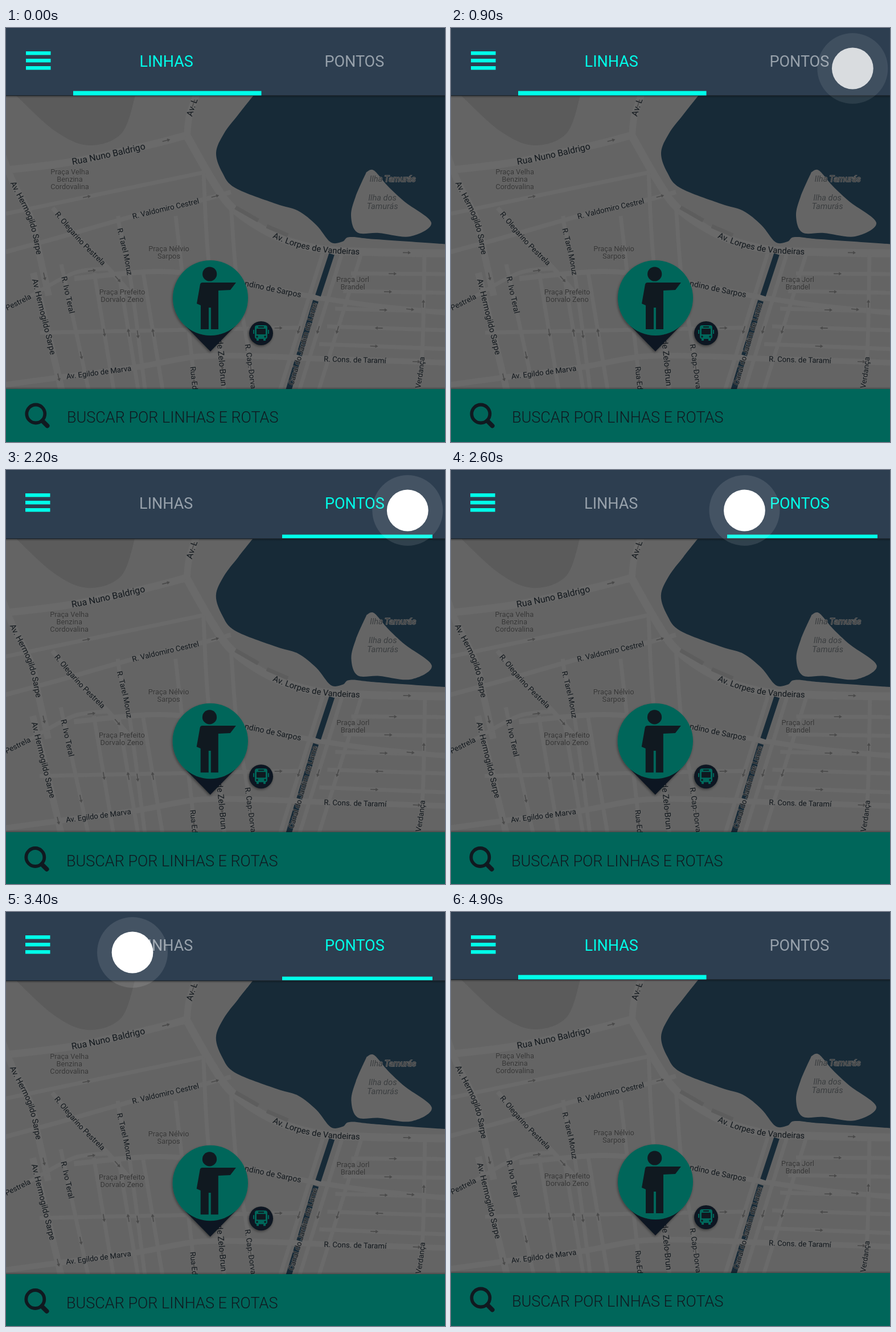
Recreate the animation shown at these times as an HTML page. Size 771 px wide and 727 px high, loop 6400 ms.

```html
<!DOCTYPE html>
<html lang="pt">
<head>
<meta charset="utf-8">
<title>Linhas e pontos</title>
<style>
html, body { margin: 0; width: 100%; height: 100%; overflow: hidden; background: #2d3e50; }
svg { display: block; width: 100%; height: 100%; font-family: Roboto, sans-serif; }
.road { fill: none; stroke: #6a6a6a; }
.street { fill: #12181d; stroke: #686868; stroke-width: 1.6; paint-order: stroke; }
.place { fill: #363636; stroke: #686868; stroke-width: 1.6; paint-order: stroke; text-anchor: middle; }
.isle { font-style: italic; fill: #3a3d3f; }
.tab { font-size: 27px; }
</style>
</head>
<body>
<svg id="stage" viewBox="0 0 771 727"></svg>
<script>
const CYAN = '#00ffe9', GREY = '#97a1ab', TEAL = '#00665a', INK = '#101920', WATER = '#172a37';
const LOOP = 6400, STEP = 100;

const roads = [], arrows = [], labels = [];
const points = text => text.split(' ').map(pair => pair.split(',').map(Number));

// Smooth curve through a few points
function curve(text) {
  const p = points(text);
  const at = i => p[Math.max(0, Math.min(p.length - 1, i))];
  const handle = (i, side) => at(i).map((v, k) => v + side * (at(i + 1)[k] - at(i - 1)[k]) / 6);
  return `M${p[0]}` + p.slice(1).map((end, i) => `C${handle(i, 1)} ${handle(i + 1, -1)} ${end}`).join('');
}

function addArrow([x0, y0], [x1, y1], part, way = 1) {
  const angle = Math.atan2((y1 - y0) * way, (x1 - x0) * way) * 180 / Math.PI;
  const x = x0 + (x1 - x0) * part, y = y0 + (y1 - y0) * part;
  arrows.push(`<path fill="#4a4a4a" d="M-7-.8H2V-3L7 0 2 3V.8H-7Z"
    transform="translate(${x} ${y}) rotate(${angle})"/>`);
}

function addRoad(width, d) {
  roads.push(`<path class="road" stroke-width="${width}" d="${d}"/>`);
}

// Straight street with one arrow
function lane(from, to, part = .5, way = 1) {
  addRoad(7, `M${from}L${to}`);
  addArrow(from, to, part, way);
}

// Name written along a path, starting at a distance from its beginning
function addLabel(d, name, start, size) {
  const id = 'way' + labels.length;
  labels.push(`<path id="${id}" fill="none" d="${d}"/><text class="street" font-size="${size}" dy=".35em">
    <textPath href="#${id}" startOffset="${start}">${name}</textPath></text>`);
}

function avenue(width, text, name, start, size = 13.2) {
  const d = curve(text);
  addRoad(width, d);
  addLabel(d, name, start, size);
  const [from, to] = points(text).slice(-2);
  addArrow(from, to, .5);
  return d;
}

const place = (lines, x, y, size = 12.8, gap = 13, extra = '') => lines.map((line, i) =>
  `<text class="place ${extra}" font-size="${size}" x="${x}" y="${y + i * gap}">${line}</text>`).join('');

function layStreets() {
  for (let i = 0; i < 3; i++) {
    lane([155 + 43 * i, 430], [190 + 43 * i, 640], .5, i ? -1 : 1);
    lane([556 + 34 * i, 396], [480 + 34 * i, 640], .55);
  }
  for (let i = 0; i < 5; i++) {
    lane([606 - 14 * i, 431 + 31 * i], [780, 432 + 33 * i], .42, i === 3 ? -1 : 1);
  }
  lane([0, 326], [355, 252], .4);
  lane([60, 535], [520, 526], .91);

  avenue(13, '-5,250 115,235 245,207 318,188', 'Rua Nuno Baldrigo', 122, 15.8);
  avenue(12, '318,190 322,154 337,110', 'Av. L', 36, 15);
  avenue(12, '-8,218 12,270 44,335 60,403 75,470', 'Av. Hermogildo Sarpe', 56, 14.2);
  avenue(12, '48,430 85,582 100,645', 'Av. Hermogildo Sarpe', 11, 14.2);
  avenue(8, '-8,395 85,370 222,331 340,303 395,288', 'R. Valdomiro Cestrel', 239);
  avenue(8, '82,316 130,372 178,420 215,462', 'R. Olegarino Pestrela', 11);
  avenue(14, '318,190 364,270 400,318 467,362 540,386 628,393 780,396', 'Av. Lorpes de Vandeiras', 236, 14.6);
  avenue(7, '197,330 200,352 218,436 245,640', 'R. Tarel Moruz', 22);
  avenue(7, '97,415 102,437 118,510 146,640', 'R. Ivo Teral', 22, 13.6);
  avenue(7, '-8,496 46,469 120,430 182,422', 'Pestrela', 9);
  avenue(9, '120,440 250,428 330,432 415,447 523,469 640,487 780,501', 'ndino de Sarpos', 302, 14);
  avenue(7, '395,310 405,440 424,555 436,640', 'R. Cap. Dorva', 247);
  avenue(7, '347,255 355,400 375,547 384,640', 'de Zelo Brun', 294, 14.6);
  avenue(7, '298,330 328,594 332,640', 'Rua Ed', 266);
  avenue(7, '719,655 731,570 735,398', 'Verdança', 23);
  const main = avenue(10, '-5,627 106,612 227,596 335,577 430,576 558,581 662,584 780,588',
    'Av. Egildo de Marva', 112);
  addLabel(main, 'R. Cons. de Taramí', 567, 13.2);
  addLabel('M498 634L544 478', 'Canal do Jardim de Lume', 8, 13.2);
}

const pin = () => `
  <g filter="url(#soft)">
    <path fill="${INK}" d="M315 523H403L359 568Z"/>
    <circle cx="359" cy="474" r="66" fill="${TEAL}"/>
  </g>
  <g fill="${INK}">
    <circle cx="357.7" cy="432" r="12.6"/>
    <path d="M341 450Q342 447 345 447H404L394 460 373 461V529H360V491H356V529H342V487L335 484Z"/>
    <circle cx="448" cy="536" r="21" filter="url(#soft)"/>
  </g>
  <g fill="${TEAL}">
    <rect x="437" y="522" width="22" height="24" rx="4"/>
    <path d="M440 545H444V549H440ZM452 545H456V549H452ZM434 530H436V537H434ZM460 530H462V537H460Z"/>
  </g>
  <g fill="${INK}">
    <rect x="440" y="528" width="16" height="10" rx="1"/><rect x="443" y="524" width="10" height="2"/>
    <circle cx="441" cy="542" r="1.7"/><circle cx="455" cy="542" r="1.7"/>
  </g>`;

function map() {
  layStreets();
  const shore = '439,113 408,152 383,185 369,219 380,254 403,281 475,309 513,321 545,346 570,376 591,375 604,367 650,371 780,380';
  const island = '633,253 646,250 670,277 700,305 747,342 710,366 655,360 617,359 606,330 614,296 633,253';
  return `<g id="map">
    <rect x="-5" y="100" width="790" height="560" fill="#646464"/>
    <path fill="#5b5b5b" d="${curve('14,115 85,180 145,206 203,185 228,115')}Z"/>
    ${roads.join('')}
    <path stroke="#5d5d5d" stroke-width="7" d="M403 315L443 338M458 348L495 364"/>
    <path fill="${WATER}" d="${curve(shore)}V113Z"/>
    <path fill="#656565" d="${curve(island)}Z"/>
    <path stroke="${WATER}" stroke-width="10" d="M572 397L548 470M544 479L515 575M512 584L495 640"/>
    ${arrows.join('')}${labels.join('')}
    ${place(['Praça Velha', 'Benzina', 'Cordovalina'], 112, 257)}
    ${place(['Praça Nélvio', 'Sarpos'], 286, 392)}
    ${place(['Praça Prefeito', 'Dorvalo Zeno'], 204, 468)}
    ${place(['Praça Jorl', 'Brandel'], 609, 446)}
    ${place(['Ilha Tamurás'], 679, 270, 14.6, 15, 'isle')}
    ${place(['Ilha dos', 'Tamurás'], 661, 303, 14.6, 15, 'isle')}
    ${pin()}
  </g>`;
}

// One full screen with the first or the second tab selected
function screen(first) {
  const head = first ? 118 : 120, foot = first ? 634 : 636, dx = first ? 0 : -1;
  const line = first ? 'x="118" y="110.6" width="330.5" height="7.8"' : 'x="485" y="113.5" width="264" height="6.3"';
  const bars = [0, 1, 2].map(i => `<rect x="${35 + dx}" y="${41 + 13 * i}" width="43.5" height="6.4"/>`).join('');
  return `
    <g ${first ? '' : 'transform="matrix(1.0025 0 0 1.0032 -1.1 .5)"'}>${first ? map() : '<use href="#map"/>'}</g>
    <rect y="${head}" width="771" height="5" fill="url(#shade)"/>
    <rect width="771" height="${head}" fill="#2d3e50"/>
    <rect width="771" height="1" fill="#26364a"/>
    <rect y="${head}" width="771" height="1.3" fill="#1d252d"/>
    <g fill="${CYAN}">${bars}<rect ${line}/></g>
    <text class="tab" x="${234.6 + dx / 2}" y="68" fill="${first ? CYAN : GREY}">LINHAS</text>
    <text class="tab" x="${559.4 - dx / 2}" y="68" fill="${first ? GREY : CYAN}">PONTOS</text>
    <rect y="${foot - 4}" width="771" height="4" fill="url(#rise)"/>
    <rect y="${foot}" width="771" height="100" fill="${TEAL}"/>
    <g transform="translate(${dx} ${first ? 0 : 2.5})">
      <circle cx="52.3" cy="677.5" r="16" fill="none" stroke="${INK}" stroke-width="5.8"/>
      <path d="M64 690L72.5 698.5" stroke="${INK}" stroke-width="8" stroke-linecap="round"/>
      <text class="tab" x="107" y="693" font-weight="300" fill="${INK}">BUSCAR POR LINHAS E ROTAS</text>
    </g>`;
}

const fade = (id, from, to) => `<linearGradient id="${id}" x1="0" y1="0" x2="0" y2="1">
  <stop offset="0" stop-opacity="${from}"/><stop offset="1" stop-opacity="${to}"/></linearGradient>`;

document.getElementById('stage').innerHTML = `
  <defs>${fade('shade', .35, 0)}${fade('rise', 0, .25)}
    <filter id="soft" x="-20%" y="-20%" width="140%" height="140%">
      <feDropShadow dx="-1" dy="2" stdDeviation="2" flood-opacity=".4"/></filter></defs>
  <g>${screen(true)}</g>
  <g id="next">${screen(false)}</g>
  <g id="touch" fill="#fff"><circle r="62" fill-opacity=".11"/><circle r="36.4"/></g>`;

const next = document.getElementById('next');
const touch = document.getElementById('touch');

// Progress from 0 to 1 between two times
const ramp = (t, from, to) => Math.max(0, Math.min(1, (t - from) / (to - from)));

function draw(now) {
  const t = Math.floor((now % LOOP) / STEP) * STEP;
  const leave = ramp(t, 4300, 4900);
  const x = 705.3 - 474.7 * ramp(t, 2200, 3200) - 47 * ramp(t, 3200, 4300);
  next.setAttribute('opacity', ramp(t, 1100, 2200) - leave);
  touch.setAttribute('opacity', ramp(t, 0, 1100) - leave);
  touch.setAttribute('transform', `translate(${x} 71)`);
  requestAnimationFrame(() => draw(performance.now()));
}
draw(0);
</script>
</body>
</html>
```
